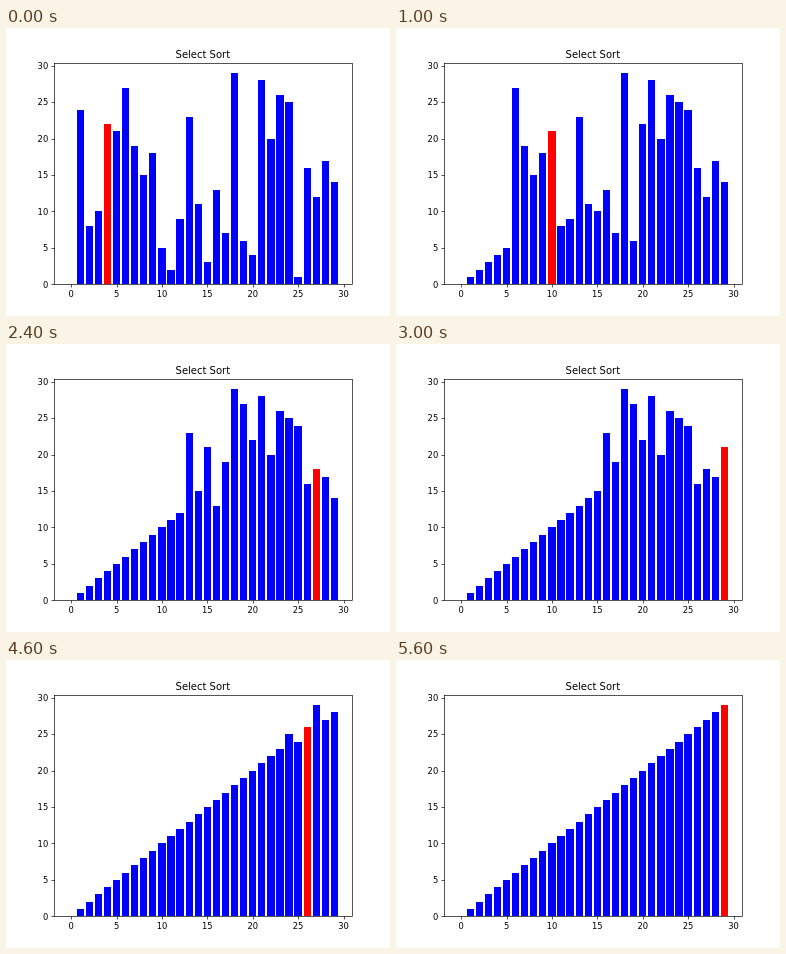
An HTML page that plays this animation: 384 by 288 pixels, repeating every 6000 ms.

```html
<!DOCTYPE html>
<html lang="en">
<head>
<meta charset="utf-8">
<title>Select Sort</title>
<style>
  html, body { margin: 0; width: 100%; height: 100%; overflow: hidden; background: #fff; }
  svg { display: block; }
  text { font-family: "DejaVu Sans", sans-serif; font-size: 8.333px; fill: #000; }
  .title { font-size: 10px; }
  .axes { fill: none; stroke: #000; stroke-width: .667; }
</style>
</head>
<body>
<svg id="stage" width="384" height="288" viewBox="0 0 384 288">
  <rect width="384" height="288" fill="#fff"/>
  <g id="bars"></g>
  <rect class="axes" x="48.5" y="35.5" width="298" height="221"/>
  <path id="ticks" class="axes"/>
  <g id="labels"></g>
  <text class="title" x="196.8" y="30" text-anchor="middle">Select Sort</text>
</svg>
<script>
const STEP = 200, LOOP = 6000;
const start = [22, 24, 8, 10, 0, 21, 27, 19, 15, 18, 5, 2, 9, 23, 11,
               3, 13, 7, 29, 6, 4, 28, 20, 26, 25, 1, 16, 12, 17, 14];

// Plot area in pixels, and the data range it covers
const plot = { left: 48, right: 345.6, top: 34.56, bottom: 256.32 };
const range = { x0: -1.89, x1: 30.89, y1: 30.45 };
const toX = v => plot.left + (v - range.x0) * (plot.right - plot.left) / (range.x1 - range.x0);
const toY = v => plot.bottom - v * (plot.bottom - plot.top) / range.y1;

const byId = id => document.getElementById(id);

function add(parent, tag, attrs, content = "") {
  const node = document.createElementNS("http://www.w3.org/2000/svg", tag);
  for (const key in attrs) node.setAttribute(key, attrs[key]);
  node.textContent = content;
  parent.appendChild(node);
  return node;
}

// One state per selection: the smallest remaining value is swapped into place
function selectionSteps(values) {
  const list = [...values], steps = [];
  for (let i = 0; i < list.length - 1; i++) {
    const marked = list.indexOf(Math.min(...list.slice(i)));
    [list[i], list[marked]] = [list[marked], list[i]];
    steps.push({ values: [...list], marked });
  }
  return steps;
}

function drawAxes() {
  let path = "";
  for (let v = 0; v <= 30; v += 5) {
    const x = Math.round(toX(v)) + .5, y = Math.round(toY(v)) + .5;
    path += `M${x} 256.5v3M48.5 ${y}h-3`;
    add(byId("labels"), "text", { x: toX(v), y: 269, "text-anchor": "middle" }, v);
    add(byId("labels"), "text", { x: 42.2, y: Math.round(toY(v) + 3.2), "text-anchor": "end" }, v);
  }
  byId("ticks").setAttribute("d", path);
}

const steps = selectionSteps(start);
const bars = start.map((_, i) => {
  const x = Math.round(toX(i - .4));
  return add(byId("bars"), "rect", { x, width: Math.round(toX(i + .4)) - x });
});

function render(time) {
  const index = Math.min(Math.floor(time % LOOP / STEP), steps.length - 1);
  const { values, marked } = steps[index];
  bars.forEach((bar, i) => {
    const y = Math.round(toY(values[i]));
    bar.setAttribute("y", y);
    bar.setAttribute("height", Math.round(plot.bottom) - y);
    bar.setAttribute("fill", i === marked ? "#f00" : "#00f");
  });
}

drawAxes();
const begin = performance.now();
function tick() {
  render(performance.now() - begin);
  requestAnimationFrame(tick);
}
tick();
</script>
</body>
</html>
```
